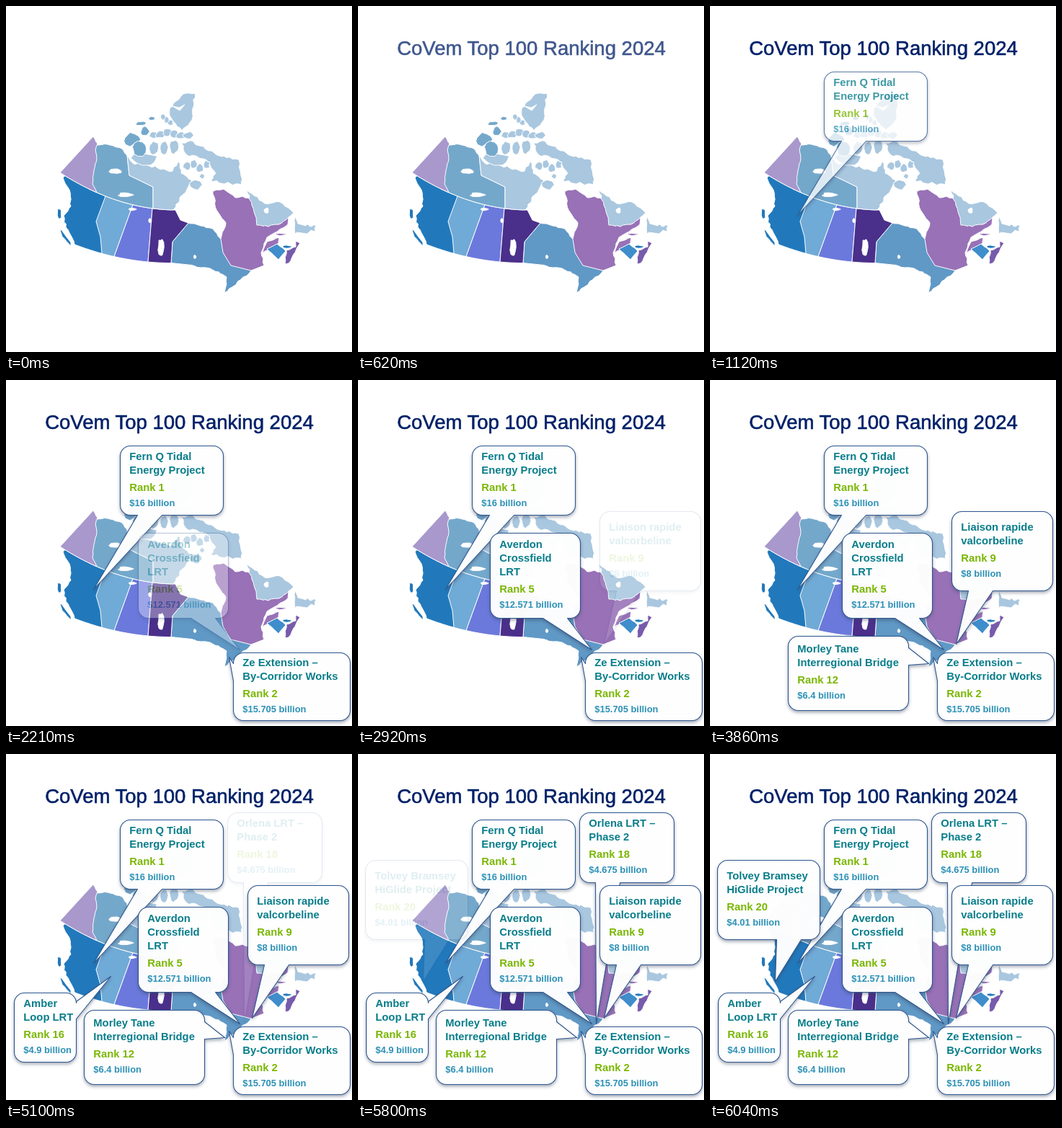
Recreate the animation shown at these times as an HTML page. Size 480 by 480 pixels, loop 8000 ms.

```html
<!DOCTYPE html>
<html lang="en">
<head>
<meta charset="utf-8">
<title>Top 100 Ranking</title>
<style>
  html, body { margin: 0; width: 100%; height: 100%; overflow: hidden; background: #fff; }
  svg { display: block; width: 100vw; height: 100vh; }
  text { font-family: "Liberation Sans", Arial, sans-serif; }
  #map path { stroke: #fff; stroke-width: 1; stroke-linejoin: round; }
  #title { font-size: 27.5px; fill: #002068; stroke: #002068; stroke-width: .6; text-anchor: middle; }
  .bubble { fill: #fff; fill-opacity: .97; stroke: #2d568f; stroke-width: 1.1; stroke-linejoin: round; }
  .name, .rank, .cost { font-size: 14.8px; font-weight: 700; }
  .name { fill: #087d8a; }
  .rank { fill: #7ab704; }
  .cost { font-size: 12.9px; fill: #2c91b6; }
</style>
</head>
<body>
<svg viewBox="0 0 480 480">
  <defs>
    <filter id="shadow" filterUnits="userSpaceOnUse" x="0" y="0" width="480" height="480">
      <feDropShadow dx="0" dy="2.5" stdDeviation="2.2" flood-color="#33435c" flood-opacity=".45"/>
    </filter>
  </defs>
  <g id="map"></g>
  <text id="title" x="240.5" y="68">CoVem Top 100 Ranking 2024</text>
  <g id="callouts" transform="translate(.5 .5)"></g>
</svg>
<script>
const LOOP = 8000, STEP = 60;
const ICE = "#a9c7df", NORTH = "#74a8cb", WEST = "#2179bc", PLUM = "#9871b7", LAKES = "#6099c6";
const $ = id => document.getElementById(id);

let seed = 11;
const rand = () => (seed = seed * 16807 % 2147483647) / 2147483647;
const jitter = r => (rand() * 2 - 1) * r;

function add(parent, tag, attrs, text) {
  const el = document.createElementNS("http://www.w3.org/2000/svg", tag);
  for (const key in attrs) el.setAttribute(key, attrs[key]);
  if (text) el.textContent = text;
  parent.appendChild(el);
  return el;
}

const shape = (fill, pts) => add($("map"), "path", { fill, d: `M${pts.join(" ")}Z` });
const points = s => s.split(" ").filter(Boolean).map(p => p.split(",").map(Number));

// Coastline: key points joined by lightly broken lines.
function coast(s, r = 1.2) {
  const keys = points(s), out = [];
  keys.forEach(([x, y], i) => {
    out.push([x, y]);
    if (i === keys.length - 1) return;
    const [u, v] = keys[i + 1], n = Math.round(Math.hypot(u - x, v - y) / 4.5);
    for (let k = 1; k < n; k++)
      out.push([x + (u - x) * k / n + jitter(r), y + (v - y) * k / n + jitter(r)]);
  });
  return out;
}

const land = (fill, shore, border = [], r) => shape(fill, [...coast(shore, r), ...border]);

function blob(fill, x, y, rx, ry) {
  shape(fill, Array.from({ length: 11 }, (_, i) => {
    const a = i / 11 * Math.PI * 2, r = .75 + rand() * .45;
    return [x + Math.cos(a) * rx * r, y + Math.sin(a) * ry * r];
  }));
}

// The two curved parallels that bound the western regions.
const north = x => [x, 283 - .002 * (236 - x) ** 2];
const south = x => [x, 356.5 - .00143 * (229 - x) ** 2];
const along = (curve, a, b) => Array.from({ length: 9 }, (_, i) => curve(a + (b - a) * i / 8));
const stripe = (fill, a, b, c, d) => shape(fill, [...along(north, a, b), ...along(south, d, c)]);

function drawMap() {
  stripe("#70aad6", 122, 176, 122, 150);
  stripe("#6b79dc", 176, 203, 150, 197);
  land(LAKES, "253,301 287,309 298,323 340,367 325,380 303,398 306,376 283,364 253,359", [south(229), [231, 327]]);
  shape("#4a2f8b", [...along(north, 203, 235), [242, 297], [253, 301], [231, 327], ...along(south, 229, 197)]);
  land(WEST, "95,331 92,322 83,307 80,291 90,278 88,255 79,238",
    [...along(north, 82, 138), [125, 299], [131, 320], ...along(south, 133, 95)]);
  land(NORTH, "122,193 141,192 161,198 168,207", [[171, 235], [204, 251], ...along(north, 204, 115)]);
  land("#a898cc", "126,259 120,247 122,228 126,211 124,200 127,191 121,181", along(north, 75, 126), .6);
  land(ICE, "168,207 176,218 197,221 231,229 239,216 243,232 258,242 245,262 232,283",
    [...along(north, 232, 204), [204, 251], [171, 235]], 1.8);
  land(PLUM, "298,323 305,301 292,283 287,257 302,254 318,266 328,264 340,268 378,303 392,292 391,303 362,321 354,342 358,360",
    [[340, 367], [312, 360], [301, 342]], .9);
  land(ICE, "334,255 359,274 380,272 399,287 392,293 378,303 364,306 348,304 344,285 334,255");
  land(PLUM, "354,344 362,327 379,321 378,329 354,344", [], .6);
  land("#3f8ecb", "362,337 376,330 388,340 378,352 362,337", [], .7);
  land("#775bac", "389,339 402,334 402,326 408,329 392,357 387,358 389,339", [], .8);
  land(ICE, "401,292 405,302 430,305 429,313 401,316 401,292", [], 2.4);
  land(WEST, "75,309 90,328 90,333 78,320 75,309", [], .5);
  blob(WEST, 74, 288, 3, 8);
  blob(WEST, 390, 334, 6, 2);
  blob(PLUM, 381, 317, 7, 1.6);

  // Arctic islands
  land(ICE, "227,142 246,122 262,121 258,158 244,173 227,152 227,142");
  land(ICE, "243,190 260,188 293,207 323,213 327,248 284,243 291,232 277,213 250,206 243,190", [], 2);
  blob(ICE, 192, 213, 19, 8);
  blob(NORTH, 174, 185, 12, 9);
  blob(NORTH, 185, 198, 11, 10);
  blob(NORTH, 193, 174, 6, 7);
  blob(NORTH, 187, 163, 7, 3);
  blob(NORTH, 202, 156, 5, 2.5);
  for (let i = 0; i < 6; i++) blob(ICE, 205 + i * 9.5, 177 + jitter(3), 7, 5);
  for (let i = 0; i < 3; i++) blob(ICE, 205 + i * 14, 196, 6, 9);
  for (let i = 0; i < 4; i++) blob(ICE, 251 + i * 9, 222 + jitter(5), 5, 6);
  for (let i = 0; i < 3; i++) blob(ICE, 218 + i * 5, 154 + i * 4, 4, 4);
  blob(ICE, 263, 248, 8, 8);
  blob(ICE, 272, 236, 4, 3);

  // Inland water
  const lake = (...box) => blob("#fff", ...box);
  lake(151, 229, 9, 3.5);
  lake(166, 262, 10, 3);
  lake(176, 282, 6, 1.5);
  lake(200, 298, 2, 3);
  lake(215, 335, 4, 12);
  lake(262, 348, 2, 2.5);
  lake(361, 284, 3, 4);
  shape("#fff", points("231,139 240,141 248,137 241,145"));
}

// box: left, top, right, bottom; tail: side, where it leaves the box, tip x, tip y
const callouts = [
  { start: 5100, steps: 5, box: [307, 81, 438, 178], tail: ["b", 329, 330, 374],
    name: ["Orlena LRT –", "Phase 2"], rank: 18, cost: "4.675" },
  { start: 1000, steps: 4, box: [158, 91, 301, 187], tail: ["b", 182, 121, 290],
    name: ["Fern Q Tidal", "Energy Project"], rank: 1, cost: "16" },
  { start: 1440, steps: 5, box: [315, 378, 477, 472], tail: ["l", 393, 309, 384],
    name: ["Ze Extension –", "By-Corridor Works"], rank: 2, cost: "15.705" },
  { start: 2210, steps: 4, box: [183, 212, 308, 330], tail: ["b", 256, 324, 374],
    name: ["Averdon", "Crossfield", "LRT"], rank: 5, cost: "12.571" },
  { start: 2920, steps: 5, box: [335, 182, 475, 292], tail: ["b", 358, 341, 366],
    name: ["Liaison rapide", "valcorbeline"], rank: 9, cost: "8" },
  { start: 3620, steps: 5, box: [108, 355, 275, 458], tail: ["r", 371, 303, 393],
    name: ["Morley Tane", "Interregional Bridge"], rank: 12, cost: "6.4" },
  { start: 4390, steps: 4, box: [11, 331, 97, 427], tail: ["r", 343, 145, 308],
    name: ["Amber", "Loop LRT"], rank: 16, cost: "4.9" },
  { start: 5800, steps: 5, box: [10, 147, 152, 257], tail: ["b", 92, 90, 315],
    name: ["Tolvey Bramsey", "HiGlide Project"], rank: 20, cost: "4.01" }
];

function bubble([l, t, r, b], [side, at, tx, ty]) {
  const c = 14, end = at + (side === "b" ? 34 : 24);
  const arc = (x, y) => `A${c} ${c} 0 0 1 ${x} ${y}`;
  const tip = {
    r: `L${r} ${at}L${tx} ${ty}L${r} ${end}`,
    b: `L${end} ${b}L${tx} ${ty}L${at} ${b}`,
    l: `L${l} ${end}L${tx} ${ty}L${l} ${at}`
  };
  const edge = s => s === side ? tip[s] : "";
  return `M${l + c} ${t}H${r - c}${arc(r, t + c)}${edge("r")}V${b - c}${arc(r - c, b)}${edge("b")}` +
    `H${l + c}${arc(l, b - c)}${edge("l")}V${t + c}${arc(l + c, t)}Z`;
}

function addCallout(c) {
  const [left, top, , bottom] = c.box;
  const g = c.el = add($("callouts"), "g");
  add(g, "path", { class: "bubble", d: bubble(c.box, c.tail), filter: "url(#shadow)" });
  let y = (top + bottom) / 2 - 10 - 9.5 * c.name.length;
  const line = (kind, text, gap) => {
    add(g, "text", { class: kind, x: left + 12.8, y }, text);
    y += gap;
  };
  c.name.forEach((text, i) => line("name", text, i < c.name.length - 1 ? 19 : 24));
  line("rank", `Rank ${c.rank}`, 21);
  line("cost", `$${c.cost} billion`, 0);
}

// Stepped fade that reaches full opacity on its last step.
function fade(t, start, steps, gain) {
  if (t < start) return 0;
  const left = Math.max(0, steps - 1 - Math.floor((t - start) / STEP));
  return 1 - left * gain;
}

function draw(t) {
  $("title").setAttribute("opacity", fade(t, 320, 8, .125));
  for (const c of callouts) c.el.setAttribute("opacity", fade(t, c.start, c.steps, .22));
}

drawMap();
callouts.forEach(addCallout);

const begin = performance.now();
function tick() {
  draw((performance.now() - begin) % LOOP);
  requestAnimationFrame(tick);
}
tick();
</script>
</body>
</html>
```
